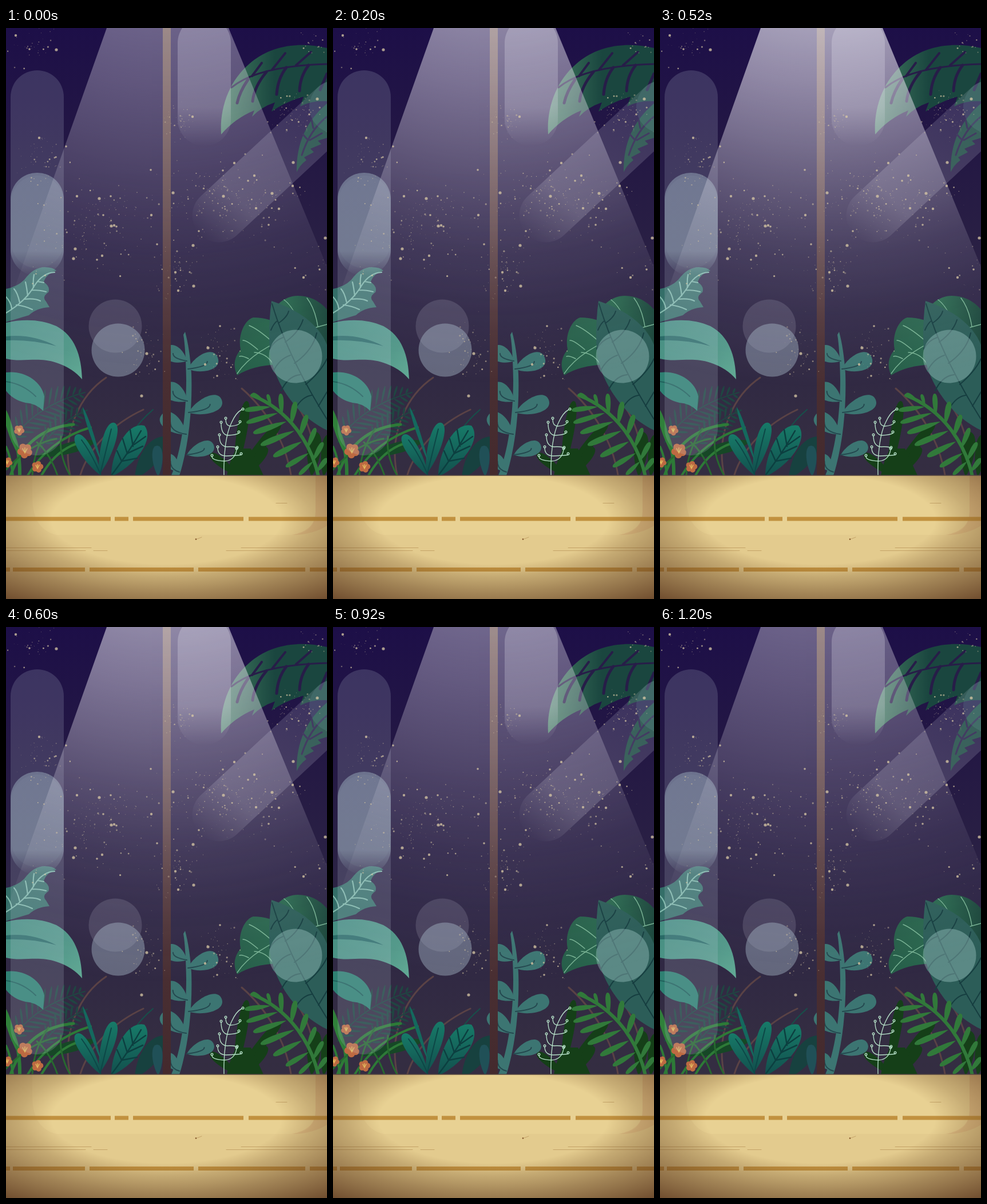
An HTML page that plays this animation: 561 px wide and 998 px high, repeating every 1400 ms.

```html
<!DOCTYPE html>
<html lang="en">
<head>
<meta charset="utf-8">
<title>Night garden stage</title>
<style>
html, body { margin: 0; width: 100%; height: 100%; overflow: hidden; background: #2b2342; }
svg { display: block; width: 100%; height: 100%; }
.beam { animation: glow 1400ms step-end infinite; }
@keyframes glow {
  0% { opacity: .58; }
  14.2857% { opacity: .81; }
  28.5714% { opacity: 1; }
  42.8571% { opacity: .84; }
  57.1429% { opacity: .61; }
  71.4286% { opacity: .4; }
  85.7143%, 100% { opacity: .58; }
}
.line { fill: none; stroke-linecap: round; }
</style>
</head>
<body>
<svg viewBox="0 0 561 998" preserveAspectRatio="none">
<defs>
  <linearGradient id="sky" x2="0" y2="1">
    <stop offset="0" stop-color="#1d0f48"/><stop offset=".2" stop-color="#231744"/>
    <stop offset=".5" stop-color="#2d2544"/><stop offset=".72" stop-color="#342d42"/><stop offset="1" stop-color="#332d40"/>
  </linearGradient>
  <radialGradient id="light" gradientUnits="userSpaceOnUse" cx="282" cy="-300" r="930">
    <stop offset=".32" stop-color="#f0eef6" stop-opacity=".65"/><stop offset=".43" stop-color="#ece8f3" stop-opacity=".55"/>
    <stop offset=".54" stop-color="#e8e4f0" stop-opacity=".43"/><stop offset=".645" stop-color="#e4e0ec" stop-opacity=".3"/>
    <stop offset=".75" stop-color="#e0dce8" stop-opacity=".17"/><stop offset=".86" stop-color="#e0dce8" stop-opacity=".07"/>
    <stop offset="1" stop-color="#e0dce8" stop-opacity="0"/>
  </radialGradient>
  <linearGradient id="wood" x2="0" y2="1">
    <stop offset="0" stop-color="#6a4e48"/><stop offset=".45" stop-color="#5b4042"/>
    <stop offset=".7" stop-color="#4b3034"/><stop offset="1" stop-color="#442a2d"/>
  </linearGradient>
  <linearGradient id="fadeDown" x2="0" y2="1">
    <stop offset="0" stop-color="#e4e4ee" stop-opacity=".27"/><stop offset=".7" stop-color="#e4e4ee" stop-opacity=".23"/>
    <stop offset="1" stop-color="#e4e4ee" stop-opacity="0"/>
  </linearGradient>
  <linearGradient id="blueFade" x2="0" y2="1">
    <stop offset="0" stop-color="#a8c0cc" stop-opacity=".42"/><stop offset=".76" stop-color="#a8c0cc" stop-opacity=".42"/>
    <stop offset="1" stop-color="#a8c0cc" stop-opacity="0"/>
  </linearGradient>
  <linearGradient id="slant" gradientUnits="userSpaceOnUse" x1="338" y1="360" x2="576" y2="138">
    <stop offset="0" stop-color="#d8d6e4" stop-opacity="0"/><stop offset=".28" stop-color="#d8d6e4" stop-opacity=".2"/>
    <stop offset="1" stop-color="#c8cde0" stop-opacity=".16"/>
  </linearGradient>
  <linearGradient id="palm" gradientUnits="userSpaceOnUse" x1="378" y1="0" x2="470" y2="0">
    <stop offset="0" stop-color="#417a60"/><stop offset="1" stop-color="#1a463f"/>
  </linearGradient>
  <linearGradient id="mint" x2="1" y2="1">
    <stop offset="0" stop-color="#438d80"/><stop offset=".65" stop-color="#53998a"/><stop offset="1" stop-color="#63ab96"/>
  </linearGradient>
  <linearGradient id="jade" x2="1" y2="0">
    <stop offset="0" stop-color="#265e49"/><stop offset=".55" stop-color="#2a684f"/><stop offset="1" stop-color="#1c473c"/>
  </linearGradient>
  <linearGradient id="teal" x2="0" y2="1">
    <stop offset="0" stop-color="#177a68"/><stop offset="1" stop-color="#124f4d"/>
  </linearGradient>
  <radialGradient id="shade" cx=".5" cy=".36" r=".85">
    <stop offset=".42" stop-color="#6a4018" stop-opacity="0"/><stop offset=".54" stop-color="#64401c" stop-opacity=".24"/>
    <stop offset=".7" stop-color="#5e3a1c" stop-opacity=".48"/><stop offset=".97" stop-color="#553019" stop-opacity=".83"/>
  </radialGradient>
  <clipPath id="garden"><path d="M0 0H561V782H0Z"/></clipPath>
</defs>

<rect width="561" height="998" fill="url(#sky)"/>
<g clip-path="url(#garden)">
  <!-- hanging palms -->
  <path fill="url(#palm)" d="M376 186C373 140 390 92 426 62C458 34 505 22 561 35V128Q536 126 514 137L520 120Q490 128 464 146L470 130Q446 138 430 155L434 144Q400 158 376 186Z"/>
  <path fill="#1b4a40" d="M508 252C507 210 520 166 561 132V192L545 197L551 203L532 211L538 217L521 226L525 231Q513 240 508 252Z"/>
  <g class="line" stroke="#271d48" stroke-width="5">
    <path d="M394 104Q440 66 561 63" stroke-width="3"/>
    <path d="M423 90Q408 112 404 131M455 77Q434 102 431 128M490 69Q475 88 473 116M529 65Q514 84 513 110M561 80L549 108"/>
    <path d="M430 84L447 61M465 73L488 44M507 65L533 42" stroke-width="4"/>
    <path d="M517 222Q531 178 561 155M526 194L519 186M537 175L534 160M531 196L552 184" stroke-width="3"/>
  </g>

  <!-- back growth -->
  <g class="line" stroke="#5a4245" stroke-width="3">
    <path d="M175 611C132 640 96 704 112 781M240 667C190 690 145 732 130 781M412 630C456 668 488 722 498 781M492 640C522 670 538 710 540 760"/>
  </g>
  <g id="back"></g>

  <!-- left leaves -->
  <path fill="#346e68" d="M88 424Q70 430 66 444Q78 452 74 462Q62 470 70 478L76 488Q54 489 40 502Q20 508 0 514V456Q20 452 32 440Q48 418 68 418Q82 418 88 424Z"/>
  <path class="line" stroke="#80b9ab" stroke-width="2.2" d="M0 498Q34 478 50 450Q64 428 85 427M10 490Q8 478 0 470M24 480Q20 462 14 456M38 468Q36 452 34 444M48 454Q47 440 49 431M18 484Q34 486 46 492M32 474Q50 472 60 477M45 458Q60 458 70 461M55 443L66 445"/>
  <path fill="url(#mint)" d="M0 515C30 508 62 509 88 521C120 538 132 572 133 614Q116 594 88 585C55 574 30 585 0 578Z"/>
  <path fill="#286a66" d="M0 539Q45 534 88 556Q44 544 0 546Z"/>
  <path fill="#2f8173" d="M0 602C30 598 62 616 67 644L65 669Q52 656 34 655Q12 650 0 634Z"/>
  <path class="line" stroke="#20605b" stroke-width="2" d="M0 618Q30 622 52 644"/>

  <!-- central sprig -->
  <g id="sprig" fill="#3c7572">
    <path d="M313 531Q321 560 324 604C326 660 320 730 303 782H289C308 735 315 670 315 615Q314 560 310 536Z"/>
  </g>

  <!-- right leaves -->
  <path fill="url(#jade)" d="M404 607C395 588 401 573 410 562C405 538 416 511 432 506Q450 506 466 512C462 488 486 468 510 468Q540 468 561 492V612Q520 588 476 588Q430 590 404 607Z"/>
  <path class="line" stroke="#79b394" stroke-width="1.4" d="M404 604Q440 550 561 518M424 578Q412 572 408 574M440 562Q420 545 414 546M465 548Q440 526 425 520M492 538Q475 516 466 514M518 530Q504 488 486 475M545 522Q540 490 526 472M434 567Q454 568 466 586M466 548Q490 554 506 586M504 534Q530 548 540 590"/>
  <path fill="#2c5d58" d="M464 477C504 490 546 515 561 554V703C510 679 468 622 461 565Q458 520 464 477Z"/>
  <path class="line" stroke="#163e40" stroke-width="2" d="M465 482Q492 574 561 684M474 512Q468 516 463 528M484 541Q469 546 461 561M497 572Q478 578 467 600M514 606Q493 608 481 634M534 642Q517 644 504 668M476 516Q491 506 494 495M488 549Q512 532 519 510M504 586Q536 564 543 533M524 623Q551 600 561 578M546 661L561 636"/>

  <g id="front"></g>
  <g id="wire" class="line" stroke="#b2dcc4" stroke-width="1.4">
    <path d="M381 782C380 742 385 708 394 690Q402 672 412 667"/>
  </g>
  <g id="flowers"></g>
</g>

<rect x="274" width="14" height="782" fill="url(#wood)"/>

<!-- soft shapes -->
<rect x="8" y="74" width="93" height="673" rx="46.5" fill="#c2cbdc" fill-opacity=".18"/>
<rect x="8" y="253" width="93" height="180" rx="46" fill="url(#blueFade)"/>
<rect x="9" y="258" width="92" height="162" rx="46" fill="#a8c0cc" fill-opacity=".06"/>
<rect x="300" y="-20" width="93" height="226" rx="46" fill="url(#fadeDown)"/>
<path d="M372 328L576 138" fill="none" stroke="url(#slant)" stroke-width="93" stroke-linecap="round"/>
<circle cx="576" cy="138" r="46" fill="#79b0b0" fill-opacity=".16"/>
<circle cx="191" cy="521" r="46.5" fill="#bdbccd" fill-opacity=".18"/>
<circle cx="196" cy="563" r="46.5" fill="#a9bccb" fill-opacity=".42"/>
<circle cx="506" cy="574" r="46.5" fill="#a9d0cc" fill-opacity=".38"/>

<path class="beam" d="M176 0H389L652 638H-50Z" fill="url(#light)"/>
<g id="stars" fill="#d9c9a5"></g>

<!-- floor -->
<rect y="782" width="561" height="216" fill="#e3cb8e"/>
<path d="M46 782H541V846Q541 882 500 886H88Q46 876 46 820Z" fill="#edd79a" fill-opacity=".45"/>
<path d="M541 782H561V870Q535 886 500 886Q541 878 541 846Z" fill="#d4a878" fill-opacity=".4"/>
<path class="line" stroke="#c1913f" stroke-width="7" style="stroke-linecap:butt" d="M0 858H183M190 858H214M222 858H415M424 858H561M0 946.500H7M12 946.500H138M146 946.500H328M336 946.500H523M531 946.500H561"/>
<path class="line" stroke="#a67d43" stroke-opacity=".5" stroke-width="1" d="M0 908.500H149M0 913.500H139M153 913.500H177M385 913.500H561M411 908.500H561M472 830.500H491M334 893L342 890"/>
<circle cx="332" cy="893.500" r="1.3" fill="#805428"/>
<rect y="782" width="561" height="216" fill="url(#shade)"/>
<path d="M0 782H561" stroke="#5a4a42" stroke-width="1.500"/>
</svg>

<script>
const NS = 'http://www.w3.org/2000/svg';
const layer = id => document.getElementById(id);

function add(parent, tag, attrs) {
  const el = document.createElementNS(NS, tag);
  for (const k in attrs) el.setAttribute(k, attrs[k]);
  parent.appendChild(el);
  return el;
}

// Leaf from base to tip; round near 1 gives a blunt end.
function leaf(parent, x1, y1, x2, y2, w, fill, round = .8) {
  const dx = x2 - x1, dy = y2 - y1, len = Math.hypot(dx, dy);
  const at = (t, side) => `${x1 + dx * t - dy / len * side} ${y1 + dy * t + dx / len * side}`;
  add(parent, 'path', {
    d: `M${x1} ${y1}C${at(.3, w * .7)} ${at(round, w)} ${x2} ${y2}C${at(round, -w)} ${at(.3, -w * .7)} ${x1} ${y1}Z`,
    fill
  });
}

function line(parent, d, stroke, width) {
  add(parent, 'path', { d, stroke, 'stroke-width': width, class: 'line' });
}

// Feathered frond with paired leaflets along a curved stem.
function feather(parent, d, n, reach, w, color) {
  const stem = add(parent, 'path', { d, class: 'line', stroke: color, 'stroke-width': 2 });
  const total = stem.getTotalLength();
  for (let i = 1; i <= n; i++) {
    const s = total * i / (n + 1);
    const p = stem.getPointAtLength(s), q = stem.getPointAtLength(s + 2);
    const a = Math.atan2(q.y - p.y, q.x - p.x);
    const r = reach * Math.sin(Math.PI * (.15 + .75 * i / n));
    for (const side of [-1, 1])
      leaf(parent, p.x, p.y, p.x + r * Math.cos(a + side * .9), p.y + r * Math.sin(a + side * .9), w, color);
  }
}

const back = layer('back'), front = layer('front'), sprig = layer('sprig');

feather(back, 'M8 724Q50 660 138 637', 13, 38, 3, '#204542');
feather(back, 'M60 735Q88 690 142 668', 9, 28, 3, '#204542');
leaf(back, 225, 788, 275, 714, 24, '#17413f');
leaf(back, 266, 784, 264, 730, 14, '#205057', 1);
leaf(back, 50, 750, 158, 722, 15, '#164726');

// dark shrub
for (const [x1, y1, x2, y2, w] of [
  [399, 786, 421, 652, 14], [404, 782, 357, 744, 12], [410, 770, 480, 690, 13],
  [416, 784, 456, 733, 14], [534, 784, 541, 706, 19], [555, 784, 566, 710, 17]
]) leaf(back, x1, y1, x2, y2, w, '#153f18', 1);
add(back, 'path', { d: 'M386 782Q396 735 408 735H428L450 782Z', fill: '#153f18' });

// sprig leaves with midribs
for (const [x1, y1, x2, y2, w] of [
  [318, 596, 370, 576, 24], [319, 672, 377, 650, 23], [316, 746, 363, 729, 20],
  [316, 582, 279, 562, 22], [317, 652, 278, 626, 24], [315, 710, 272, 676, 23], [303, 776, 279, 747, 17]
]) {
  leaf(sprig, x1, y1, x2, y2, w, '#3c7572', 1);
  const mx = x1 + (x2 - x1) * .65, my = y1 + (y2 - y1) * .65;
  line(sprig, `M${x1} ${y1}Q${mx} ${y1 - 4} ${mx} ${my}`, '#24484f', 2);
}

// grass
for (const [d, w] of [
  ['M8 782C26 730 62 698 118 693', 5], ['M38 782C62 742 100 712 148 698', 4],
  ['M0 690Q25 722 24 782', 6], ['M12 782Q8 748 0 732', 4],
  ['M62 782Q88 735 132 724', 4], ['M90 782Q76 742 54 724', 3],
  ['M46 782Q48 738 74 700', 3], ['M112 782Q92 746 96 714', 3], ['M0 772Q42 726 88 718', 3]
]) line(front, d, w > 3 ? '#2d7a37' : '#27682f', w);
leaf(front, 18, 740, -4, 662, 8, '#30803a');

// teal clumps
leaf(front, 166, 782, 123, 711, 17, 'url(#teal)', 1);
leaf(front, 163, 780, 189, 690, 18, 'url(#teal)', 1);
leaf(front, 166, 758, 134, 662, 5, '#14695e');
line(front, 'M166 782Q150 744 132 720M165 778Q176 734 184 701', '#0d4747', 2);
line(front, 'M194 760Q215 702 257 667', '#174f4a', 2);
leaf(front, 184, 784, 242, 695, 31, 'url(#teal)', .9);
line(front, 'M184 782Q214 743 236 704M202 757L194 739M212 744L204 718M222 731L217 702M203 757L229 752M213 743L239 731M224 728L244 714', '#0c3f40', 2.5);

// green fern
line(front, 'M546 784C534 728 496 668 430 642', '#31793a', 6);
for (const [x1, y1, x2, y2, w] of [
  [449, 651, 430, 639, 6], [462, 662, 417, 668, 7], [475, 673, 420, 690, 7], [490, 688, 432, 708, 8],
  [504, 704, 445, 729, 8], [517, 723, 467, 749, 8], [529, 743, 489, 767, 7], [536, 758, 512, 781, 6],
  [463, 660, 457, 640, 5], [482, 678, 480, 639, 7], [498, 694, 506, 653, 8], [513, 715, 526, 676, 8],
  [526, 736, 541, 699, 7], [536, 757, 554, 724, 7], [543, 776, 561, 752, 7]
]) leaf(front, x1, y1, x2, y2, w, '#31793a', 1);

// wiry plant: paired curls ending in tiny rings
const wire = layer('wire');
[[384, 682, 409, 688, 392, 696], [376, 689, 407, 706, 388, 712], [373, 711, 404, 733, 386, 732],
 [370, 732, 411, 744, 384, 748], [360, 747, 403, 735, 382, 757]].forEach(([lx, ly, rx, ry, x, y]) => {
  add(wire, 'path', { d: `M${lx} ${ly + 2}Q${lx} ${y - 1} ${x} ${y}Q${rx - 3} ${y - 1} ${rx} ${ry + 2}` });
  add(wire, 'circle', { cx: lx, cy: ly, r: 1.8 });
  add(wire, 'circle', { cx: rx, cy: ry, r: 1.8 });
});
add(wire, 'circle', { cx: 414, cy: 666, r: 1.8 });

for (const [x, y, r] of [[23, 703, 9], [33, 739, 13], [55, 767, 10], [2, 759, 9]]) {
  const g = layer('flowers');
  for (let i = 0; i < 5; i++) {
    const a = i * Math.PI * .4 + r;
    add(g, 'circle', { cx: x + r * .55 * Math.cos(a), cy: y + r * .55 * Math.sin(a), r: r * .48, fill: '#bd6a42' });
  }
  line(g, `M${x - r * .3} ${y - r * .3}L${x} ${y + r * .3}L${x + r * .3} ${y - r * .3}M${x} ${y + r * .3}V${y - r * .4}`, '#e2b45c', 1.5);
}

// star dust
let seed = 41;
function rand() {
  seed = (seed * 16807) % 2147483647;
  return seed / 2147483647;
}
const spread = () => rand() + rand() + rand() - 1.5;
const dot = (x, y, r, o) => add(layer('stars'), 'circle', {
  cx: x.toFixed(1), cy: y.toFixed(1), r: r.toFixed(2), 'fill-opacity': o.toFixed(2)
});
for (const [x, y, w, h, n] of [
  [38, 28, 50, 38, 38], [62, 235, 40, 48, 55], [300, 167, 28, 32, 45], [500, 152, 48, 38, 75],
  [165, 345, 75, 75, 125], [365, 300, 85, 65, 150], [300, 420, 42, 50, 60], [245, 570, 36, 60, 55],
  [376, 572, 34, 50, 45], [540, 28, 28, 26, 16], [532, 420, 38, 60, 22], [455, 310, 65, 65, 55], [75, 370, 60, 60, 30]
]) for (let i = 0; i < n; i++)
  dot(x + spread() * w, y + spread() * h, .45 + rand() ** 3 * 1.2, .3 + rand() * .45);

const bright = [
  253, 248, 292, 288, 254, 327, 183, 294, 163, 298, 124, 294, 170, 327, 184, 346, 189, 345, 193, 347,
  121, 386, 168, 398, 159, 405, 118, 403, 399, 236, 423, 267, 380, 294, 437, 315, 459, 344, 502, 235,
  501, 276, 337, 355, 327, 380, 520, 436, 548, 422, 328, 451, 301, 459, 374, 521, 237, 643, 348, 588,
  369, 608, 353, 559, 296, 427, 264, 378, 246, 569, 17, 13, 41, 37, 88, 38, 58, 192, 105, 207,
  544, 124, 326, 155, 530, 151, 558, 367, 434, 258, 379, 249, 465, 289, 477, 316
];
for (let i = 0; i < bright.length; i += 2)
  dot(bright[i], bright[i + 1], 1.8 + (i % 3) * .4, .75);
</script>
</body>
</html>
```
